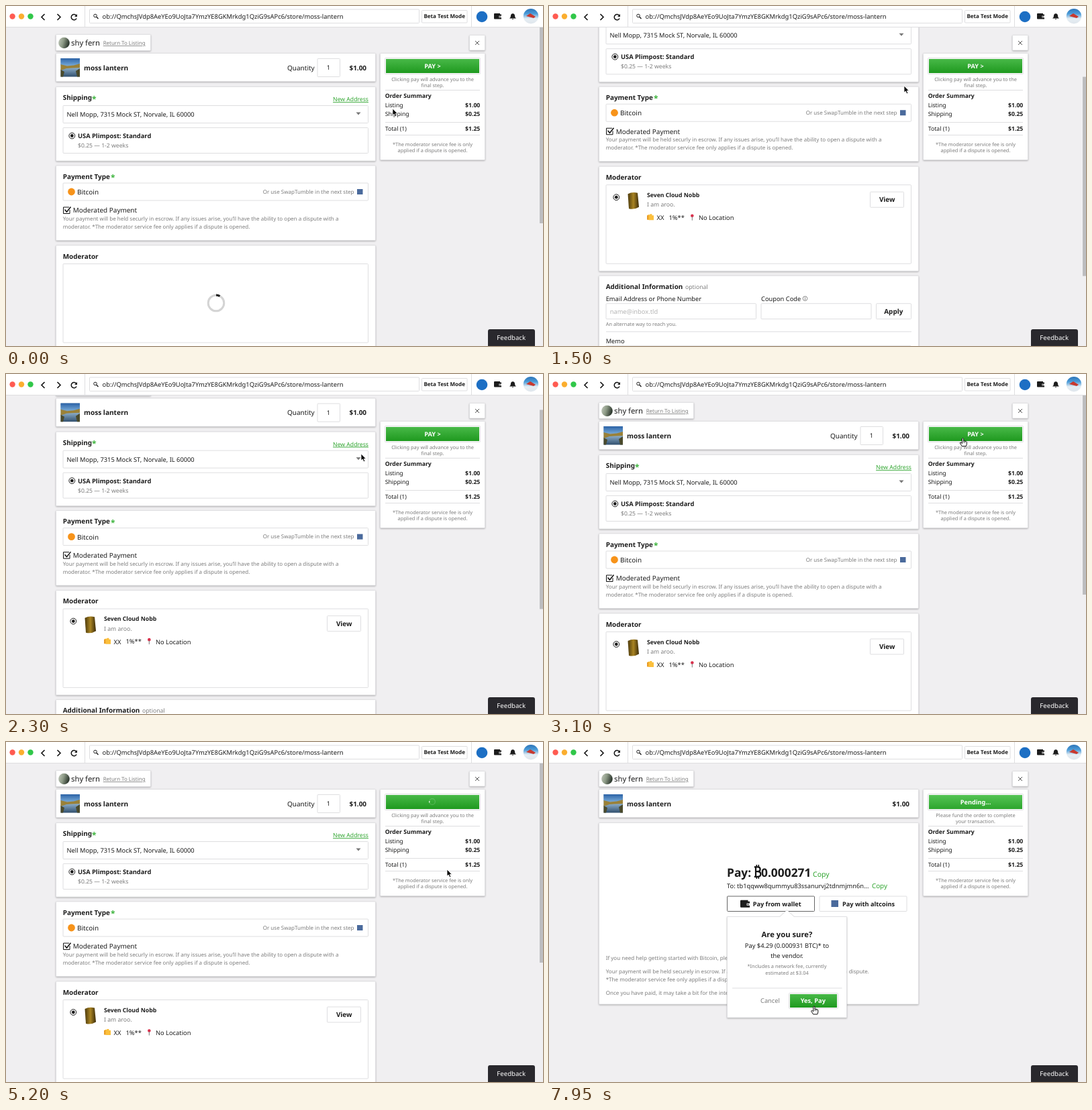
An HTML page that plays this animation: 800x507 px, repeating every 8 s.

```html
<!DOCTYPE html>
<html lang="en">
<head>
<meta charset="utf-8">
<title>Checkout</title>
<style>
html, body { margin: 0; width: 100%; height: 100%; overflow: hidden; background: #f0eff1; }
svg { display: block; width: 100vw; height: 100vh; }
text { font-family: "Noto Sans", "Open Sans", sans-serif; text-rendering: geometricPrecision; white-space: pre; }
.card { fill: #fff; stroke: #dcdcde; stroke-width: .7; filter: drop-shadow(0 1px 1px rgba(0, 0, 0, .28)); }
.box { fill: #fff; stroke: #dedee0; }
.line { stroke: #dedee0; fill: none; }
.ink { stroke: #111; fill: none; }
</style>
</head>
<body>
<svg id="stage" viewBox="0 0 800 507" xmlns="http://www.w3.org/2000/svg"></svg>
<script>
const LOOP = 8000;
const INK = '#1c1c1c', GREY = '#7c7c7c', GREEN = '#2fa52f', PALE = '#b4b4b4';

// drawing helpers
const text = (x, y, str, size = 9.3, o = {}) =>
  `<text x="${x}" y="${y}" font-size="${size}" font-weight="${o.bold ? 700 : 400}" fill="${o.fill || INK}"` +
  ` text-anchor="${o.anchor || 'start'}"${o.under ? ' text-decoration="underline"' : ''}>${str}</text>`;
const bold = (x, y, str, size = 9.93, o = {}) => text(x, y, str, size, { ...o, bold: true });
const mid = (x, y, str, size, o = {}) => text(x, y, str, size, { ...o, anchor: 'middle' });
const rect = (x, y, w, h, attrs = '') => `<rect x="${x}" y="${y}" width="${w}" height="${h}" ${attrs}/>`;
const card = (x, y, w, h) => rect(x, y, w, h, 'class="card" rx="1"');
const box = (x, y, w, h, attrs = '') => rect(x, y, w, h, `class="box" rx="1" ${attrs}`);
const path = (d, attrs = 'class="ink"') => `<path d="${d}" ${attrs}/>`;
const rule = (x1, y, x2) => path(`M${x1} ${y}H${x2}`, 'class="line"');
const dot = (x, y, r, fill) => `<circle cx="${x}" cy="${y}" r="${r}" fill="${fill}"/>`;
const ring = (x, y, r, color, width) =>
  `<circle cx="${x}" cy="${y}" r="${r}" fill="none" stroke="${color}" stroke-width="${width}"/>`;
const group = (id, body) => `<g id="${id}">${body}</g>`;
const radio = (x, y) => ring(x, y, 4.4, INK, 1) + dot(x, y, 2.4, INK);
const star = (x, y) => bold(x, y, '*', 12, { fill: '#3db43d' });
const greenButton = (x, y, w, h, fill) =>
  box(x - 1.5, y - 1.5, w + 3, h + 3) + rect(x, y, w, h, `fill="url(#${fill})"`);
const walletIcon = (x, y, s) =>
  `<g transform="translate(${x} ${y}) scale(${s})">` +
  path('M1 1H9V2.5H11V9.5H1Q0 9.5 0 8.5V2Q0 1 1 1Z', `fill="${INK}"`) + rect(7.5, 4.7, 3.5, 2.6, 'fill="#fff"') +
  dot(9, 6, .8, INK) + '</g>';

const gradient = (id, colors, attrs = 'x2="0" y2="1"') =>
  `<linearGradient id="${id}" ${attrs}>${colors.map((c, i) =>
    `<stop offset="${i / (colors.length - 1)}" stop-color="${c}"/>`).join('')}</linearGradient>`;
const defs = '<defs>' +
  gradient('pay', ['#48b948', '#1f991f']) + gradient('pending', ['#55c455', '#2da52d']) +
  gradient('lake', ['#3f6f9e', '#8fb0cc', '#31506e']) + gradient('skyline', ['#2b62a6', '#6fa3d3']) +
  gradient('sky', ['#2d74b8', '#4a9bd8', '#e6eef4', '#dfe6ec']) +
  gradient('moss', ['#c3cabd', '#8d9a86', '#2f3a30'], 'x2="1" y2=".3"') +
  gradient('gold', ['#4c3a0c', '#a98423', '#3b2b08'], '') + '</defs>';

const photo = rect(81.5, 78, 28.5, 27.5, 'fill="url(#lake)"') + rect(81.5, 78, 28.5, 10, 'fill="url(#skyline)"') +
  path('M81.5 87L91 89.5L101 88.5L110 86V92L98 92.5L90 93L81.5 96Z', 'fill="#9a8138"') +
  path('M81.5 95L87 98L85 105.5H81.5ZM110 93L104 97L106 105.5H110Z', 'fill="#4a4a2c"');
const sellerBar = card(74.5, 42.5, 141, 24) + dot(86.5, 55, 8.3, 'url(#moss)') +
  text(97, 59, 'shy fern', 11.3) + text(144.7, 58, 'Return To Listing', 7.95, { fill: GREY, under: true });
const itemCard = card(74.5, 70.5, 476, 42) + photo +
  bold(116, 95.5, 'moss lantern', 10.1) + bold(537, 95.5, '$1.00', 9.93, { anchor: 'end' });

const shipping = card(74.5, 120.5, 476, 110.5) + bold(84.7, 140, 'Shipping') + star(128, 142.5) +
  text(540, 142, 'New Address', 8.65, { fill: GREEN, under: true, anchor: 'end' }) +
  box(85, 148.5, 454.5, 26) + text(90.5, 165, 'Nell Mopp, 7315 Mock ST, Norvale, IL 60000') +
  path('M521.5 158.5H528.5L525 162.5Z', 'fill="#777"') +
  box(85, 181.5, 454.5, 38) + radio(98.3, 193.5) + bold(107, 197, 'USA Plimpost: Standard', 9.3) +
  text(107, 211, '$0.25 — 1-2 weeks', 8.65, { fill: GREY });

const payment = card(74.5, 238, 476, 111.5) + bold(84.7, 257.5, 'Payment Type') + star(156, 260) +
  box(85, 264, 454.5, 26) + dot(97.5, 277, 5.4, '#f7931a') + text(106, 281, 'Bitcoin', 9.93) +
  text(518.5, 279.5, 'Or use SwapTumble in the next step', 8.04, { fill: GREY, anchor: 'end' }) +
  rect(523, 273, 8.5, 8, 'fill="#4a6a9c"') +
  path('M94 300H85.5V309.5H95V304') + path('M87.5 303.5L90.5 307L96.5 299.5', 'class="ink" stroke-width="1.5"') +
  text(99.7, 308.3, 'Moderated Payment', 9.95) +
  text(84.7, 320, 'Your payment will be held securly in escrow. If any issues arise, you’ll have the ability to open a dispute with a', 8.04, { fill: GREY }) +
  text(84.7, 332, 'moderator. *The moderator service fee only applies if a dispute is opened.', 8.04, { fill: GREY });

const loading = ring(313, 443, 11.8, '#d4d4d4', 3) +
  group('spinner', path('M313 431.2A11.8 11.8 0 0 1 318.5 432.6', 'fill="none" stroke="#222" stroke-width="3.2"'));
const thumb = path('M147 429H150L150.5 428H153.5V430H156V437H149L147 436Z', 'fill="#fbbf3c"') + rect(146, 430, 2.3, 6.5, 'fill="#e89c28"');
const pin = dot(213.3, 430.5, 2.3, '#d9304c') + path('M213.3 432V437.5', 'stroke="#777" fill="none"');
const moderator = radio(100.3, 403) +
  path('M117.5 398Q124 394.5 132 396.5L134 417.5Q127 422 119 420Z', 'fill="url(#gold)"') +
  bold(146, 402.5, 'Seven Cloud Nobb', 8.68) + text(146, 417, 'I am aroo.', 8.68, { fill: GREY }) +
  thumb + text(160.5, 437, 'XX') + text(178.5, 436.5, '1%**') + pin + text(223, 437, 'No Location') +
  box(478.5, 395, 50, 23) + bold(503.7, 410, 'View', 9.93, { anchor: 'middle' });

const extra = card(74.5, 520, 476, 260) + bold(84.7, 539.5, 'Additional Information') +
  text(203, 539.5, 'optional', 8.68, { fill: GREY }) +
  text(84.7, 557.5, 'Email Address or Phone Number') + text(316, 557.5, 'Coupon Code') +
  ring(381.5, 554, 3.3, '#555', .7) + path('M381.5 553.3V556M381.5 551.8V552.6', 'stroke="#555" stroke-width=".8"') +
  box(85, 561.5, 223.5, 23) + text(90.7, 576.5, 'name@inbox.tld', 9.3, { fill: PALE }) +
  box(316, 561.5, 164, 23) + box(487.5, 561.5, 52, 23) + bold(513.3, 576.5, 'Apply', 9.93, { anchor: 'middle' }) +
  text(84.7, 594.5, 'An alternate way to reach you.', 7.4, { fill: GREY }) + rule(85, 603.5, 540) +
  text(84.7, 620.5, 'Memo') + box(85, 624.5, 454.5, 142) +
  text(92, 640.5, 'Provide additional details for the vendor here (optional).', 9.2, { fill: PALE });

const checkout = group('checkout', sellerBar + itemCard + text(419, 95.5, 'Quantity', 10) +
  box(464, 78.5, 33.5, 27) + mid(480.5, 95.3, '1', 9.3) + shipping + payment +
  card(74.5, 357, 476, 156) + bold(84.7, 376.5, 'Moderator') + box(85, 384.5, 454.5, 117.5) +
  group('loading', loading) + group('moderator', moderator) + extra);

const note = (y, str) => text(84.7, y, str, 8.04, { fill: GREY });
const bitcoinSign =
  path('M305.8 186.3H311Q314.6 186.3 314.6 189.8Q314.6 193.2 311 193.2H308M311 193.2Q315.3 193.2 315.3 197Q315.3 200.8 311 200.8H305.8M308 186V201',
    'class="ink" stroke-width="2.2"') +
  path('M309.3 183V186M312.3 183V186M309.3 201V204M312.3 201V204', 'class="ink" stroke-width="1.6"');
const funding = group('funding', sellerBar + itemCard + card(74.5, 120.5, 476, 270.5) +
  bold(265, 201, 'Pay:', 17.35) + bitcoinSign +
  bold(316, 201, '0.000271', 17.35) + text(393, 201, 'Copy', 10.5, { fill: GREEN }) +
  text(265, 217.5, 'To: tb1qqww8qummyu83ssanurvj2tdnmjmn6n...') + text(481, 217.5, 'Copy', 9.8, { fill: GREEN }) +
  box(265.5, 230, 130, 22.5, 'id="walletButton"') + walletIcon(285, 234.5, 1.28) + bold(303.7, 244.7, 'Pay from wallet', 9.2) +
  box(403, 230, 130, 22.5) + rect(420.5, 236, 10.5, 10, 'fill="#4a6a9c"') + bold(437, 244.7, 'Pay with altcoins', 9.2) +
  note(325, 'If you need help getting started with Bitcoin, please read') +
  text(300.3, 325, 'Need Bitcoin? on OpenBazaar.org', 8.04, { fill: GREEN, under: true }) + text(428.5, 325, '.', 8.04, { fill: GREY }) +
  note(345, 'Your payment will be held securely in escrow. If any issues arise, you’ll have the ability to open a dispute.') +
  note(357, '*The moderator service fee only applies if a dispute is opened.') +
  note(377, 'Once you have paid, it may take a bit for the interface to update.'));

const popup = group('popup', path('M265.5 260.5H344L354.5 250.5L365 260.5H443.5V411H265.5Z', 'class="card"') +
  bold(354.5, 290.5, 'Are you sure?', 11.25, { anchor: 'middle' }) +
  mid(354.5, 307, 'Pay $4.29 (0.000931 BTC)* to') + mid(354.5, 321.5, 'the vendor.') +
  mid(354.5, 336.5, '*Includes a network fee, currently', 7.4, { fill: GREY }) +
  mid(354.5, 347, 'estimated at $3.04', 7.4, { fill: GREY }) + rule(273, 367, 436.5) +
  text(315, 389, 'Cancel', 9.3, { fill: GREY }) + greenButton(359, 376, 70, 20, 'pay') +
  bold(393.3, 389.3, 'Yes, Pay', 9.3, { fill: '#fff', anchor: 'middle' }));

const sideRow = (y, label, price) => text(564.7, y, label, 8.68) + bold(706.3, y, price, 8.68, { anchor: 'end' });
const sideNote = (y, a, b) => mid(635.5, y, a, 7.4, { fill: GREY }) + mid(635.5, y + 8.7, b, 7.4, { fill: GREY });
const buttonLabel = str => bold(635.5, 93, str, 9.2, { fill: '#fff', anchor: 'middle' });
const side = card(690.5, 43.5, 23, 22.5) + path('M699 52L705 58M705 52L699 58', 'stroke="#555"') +
  card(557.5, 70.5, 156, 159) +
  group('payState', greenButton(566, 79, 139, 21, 'pay') + group('payLabel', buttonLabel('PAY &gt;')) +
    group('payBusy', ring(635, 89, 4.3, 'rgba(255,255,255,.18)', 1.2) +
      group('paySpinner', path('M635 84.7A4.3 4.3 0 0 1 637 85.2', 'stroke="#fff" fill="none" stroke-width="1.3"'))) +
    sideNote(112, 'Clicking pay will advance you to the', 'final step.')) +
  group('pendingState', greenButton(566, 79, 139, 21, 'pending') + buttonLabel('Pending...') +
    sideNote(112, 'Please fund the order to complete', 'your transaction.')) +
  rule(565, 125.5, 706) + bold(564.7, 137.3, 'Order Summary', 8.68) +
  sideRow(150.7, 'Listing', '$1.00') + sideRow(164, 'Shipping', '$0.25') + rule(565, 173.5, 706) +
  sideRow(186, 'Total (1)', '$1.25') + rule(565, 192.5, 706) +
  sideNote(209.3, '*The moderator service fee is only', 'applied if a dispute is opened.');

const header = rect(0, 0, 800, 31, 'fill="#fff"') + rule(0, 31.5, 800) +
  dot(9.6, 15.5, 4.2, '#ff5b51') + dot(23, 15.5, 4.2, '#fbae2f') + dot(36.5, 15.5, 4.2, '#30c749') +
  path('M57.5 12L53 16.5L57.5 21M76.5 12L81 16.5L76.5 21', 'class="ink" stroke-width="1.6"') +
  path('M104.8 14.5A4.1 4.1 0 1 0 105 18.5', 'class="ink" stroke-width="1.5"') + path('M106 12V16H102Z', `fill="${INK}"`) +
  path('M117.5 0V31M693.5 0V31', 'class="line"') +
  box(124.5, 5, 491, 20.5) + ring(133, 14.5, 2.3, '#222', 1) + path('M134.8 16.3L137.5 19', 'class="ink" stroke-width="1.3"') +
  text(143.5, 19, 'ob://QmchsJVdp8AeYEo9UoJta7YmzYE8GKMrkdg1QziG9sAPc6/store/moss-lantern', 9.37) +
  box(619.5, 6.5, 67.5, 18.5) + bold(653.2, 18.3, 'Beta Test Mode', 8.05, { anchor: 'middle' }) +
  dot(709, 16, 8.3, '#1d6fc4') + walletIcon(727, 10, 1) +
  path('M750 18.5Q752 17 752 14.5Q752 11.5 755 11.2Q758 11.5 758 14.5Q758 17 760 18.5ZM753.7 19.3H756.3L755 20.6Z', `fill="${INK}"`) +
  dot(782, 15.2, 11.2, 'url(#sky)') + path('M775 15L781 11L789 16L786 18Z', 'fill="#c8392f"');

const feedback = path('M718 507V485Q718 482 721 482H785Q788 482 788 485V507Z', 'fill="#29282d"') +
  mid(752.7, 498, 'Feedback', 9.6, { fill: '#fff' });
const pointer = group('arrow', path('M0 0V10L2.3 8L4 11.8L5.8 11L4.2 7.4H7.2Z', 'fill="#000" stroke="#fff" stroke-width=".8"')) +
  group('hand', path('M-1.2 .8Q0 -.6 1 .8V4.2L3 4.4L5 5L5.8 6V9L4.8 12H-1.4L-4.4 7.2Q-4 5.8 -2.6 6.6L-1.2 8Z',
    'fill="#fff" stroke="#111" stroke-width="1" stroke-linejoin="round"') +
    path('M1 4.5V7M3 5V7.3', 'class="ink" stroke-width=".7"'));

document.getElementById('stage').innerHTML = defs + rect(0, 0, 800, 507, 'fill="#f0eff1"') +
  checkout + funding + side + popup + header + rect(795, 32, 5, 297, 'id="bar" fill="#bdbdbf"') + feedback + group('cursor', pointer);

const el = id => document.getElementById(id);
const show = (id, on) => el(id).setAttribute('visibility', on ? 'visible' : 'hidden');
const move = (id, x, y) => el(id).setAttribute('transform', `translate(${x} ${y})`);
const spin = (id, t, x, y) => el(id).setAttribute('transform', `rotate(${t * .36} ${x} ${y})`);

// event times and motion tables: [ms, value...]
const LOADED = 650, PAID = 3700, FUNDING = 5300, CONFIRM = 6600;
const scrollSteps = [[1350, 0], [1600, 195], [1700, 220], [1850, 153], [2050, 90], [2300, 34.5], [2550, 0]];
const cursorSteps = [[100, 576, 153], [1000, 529, 119], [2600, 529, 119], [3300, 638, 90], [3850, 638, 90],
  [4350, 657, 190], [5400, 657, 190], [6050, 353.5, 238], [6750, 353.5, 238], [7400, 395, 394]];

const linear = u => u, smooth = u => u * u * (3 - 2 * u);
function sample(steps, t, ease) {
  const next = steps.findIndex(s => s[0] > t);
  if (next === 0) return steps[0].slice(1);
  if (next < 0) return steps[steps.length - 1].slice(1);
  const a = steps[next - 1], b = steps[next], u = ease((t - a[0]) / (b[0] - a[0]));
  return a.slice(1).map((v, i) => v + (b[i + 1] - v) * u);
}
const inside = (x, y, l, t, r, b) => x >= l && x <= r && y >= t && y <= b;

function draw(t) {
  const loaded = t >= LOADED, funded = t >= FUNDING, confirm = t >= CONFIRM, busy = t >= PAID;
  const [scroll] = sample(scrollSteps, t, linear);
  const [x, y] = sample(cursorSteps, t, smooth);
  show('checkout', !funded);
  show('loading', !loaded && !funded);
  show('moderator', loaded && !funded);
  move('checkout', 0, -scroll);
  spin('spinner', t, 313, 443);
  show('payState', !funded);
  show('payLabel', !busy && !funded);
  show('payBusy', busy && !funded);
  spin('paySpinner', t - PAID + 200, 635, 89);
  show('pendingState', funded);
  show('funding', funded);
  show('popup', confirm);
  show('bar', !funded);
  el('bar').setAttribute('y', 32 + scroll * .625);
  el('bar').setAttribute('height', loaded ? 297 : 292);

  const onWallet = funded && inside(x, y, 265, 230, 396, 253);
  const onPay = !busy && inside(x, y, 565, 79, 705, 100);
  const onYes = confirm && inside(x, y, 358, 375, 429, 397);
  el('walletButton').style.stroke = onWallet || confirm ? '#666' : '';
  const hand = onWallet || onPay || onYes;
  show('hand', hand);
  show('arrow', !hand);
  move('cursor', x, y);
}

const start = performance.now();
function tick() {
  draw((performance.now() - start) % LOOP);
  requestAnimationFrame(tick);
}
tick();
</script>
</body>
</html>
```
